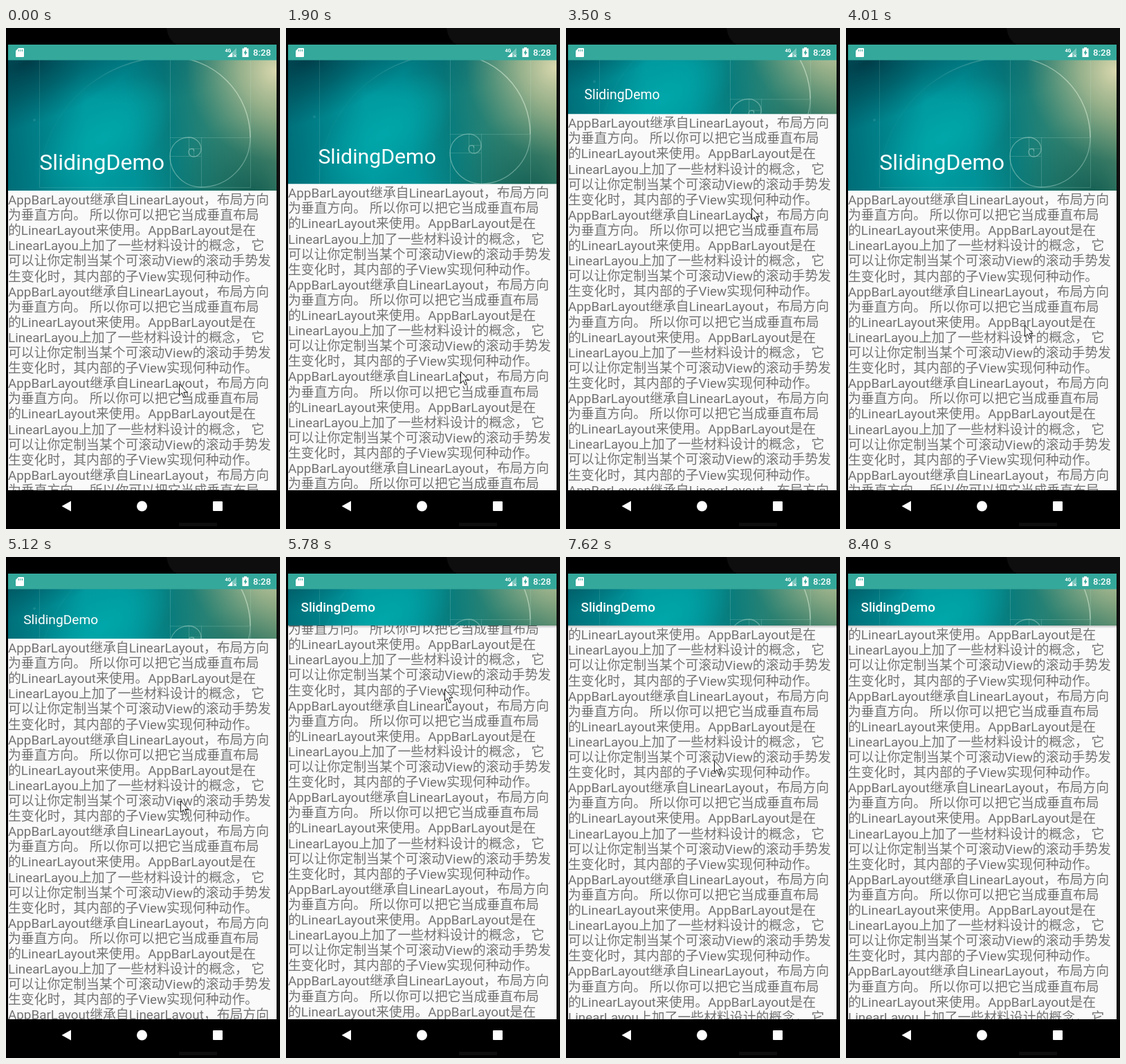
An HTML page for the animation above (8660 ms loop, 396 by 724 pixels).

```html
<!DOCTYPE html>
<html lang="zh-CN">
<head>
<meta charset="utf-8">
<title>SlidingDemo</title>
<style>
  html, body { margin: 0; width: 100%; height: 100%; overflow: hidden; background: #000; }
  svg { display: block; width: 100vw; height: 100vh; }
  text { font-family: Roboto, "Noto Sans CJK SC", "Noto Sans CJK", "Noto Sans CJK JP", sans-serif; white-space: pre; }
  #lines { font-size: 18.85px; fill: #737373; }
  .guide { fill: none; stroke: #bfe3d6; }
</style>
</head>
<body>
<svg viewBox="0 0 396 724" xmlns="http://www.w3.org/2000/svg">
  <defs>
    <linearGradient id="base" gradientUnits="userSpaceOnUse" x1="0" y1="150" x2="391" y2="110">
      <stop offset="0" stop-color="#006f79"/>
      <stop offset=".3" stop-color="#00999f"/>
      <stop offset=".45" stop-color="#00949a"/>
      <stop offset=".6" stop-color="#087c7d"/>
      <stop offset=".75" stop-color="#2b8273"/>
      <stop offset="1" stop-color="#668f6b"/>
    </linearGradient>
    <radialGradient id="dark" gradientUnits="userSpaceOnUse" cx="0" cy="0" r="1" gradientTransform="translate(30 50) rotate(-20) scale(190 88)">
      <stop offset="0" stop-color="#003642" stop-opacity=".9"/>
      <stop offset=".5" stop-color="#00444f" stop-opacity=".55"/>
      <stop offset="1" stop-color="#004c58" stop-opacity="0"/>
    </radialGradient>
    <radialGradient id="veil" gradientUnits="userSpaceOnUse" cx="0" cy="0" r="1" gradientTransform="translate(190 30) scale(150 80)">
      <stop offset="0" stop-color="#005864" stop-opacity=".5"/>
      <stop offset="1" stop-color="#005864" stop-opacity="0"/>
    </radialGradient>
    <radialGradient id="glow" gradientUnits="userSpaceOnUse" cx="0" cy="0" r="1" gradientTransform="translate(142 158) rotate(-38) scale(120 62)">
      <stop offset="0" stop-color="#00a9ab" stop-opacity=".9"/>
      <stop offset="1" stop-color="#00a9ab" stop-opacity="0"/>
    </radialGradient>
    <radialGradient id="sun" gradientUnits="userSpaceOnUse" cx="390" cy="62" r="130">
      <stop offset="0" stop-color="#d9d8ae"/>
      <stop offset=".4" stop-color="#b5c299" stop-opacity=".7"/>
      <stop offset="1" stop-color="#7fa584" stop-opacity="0"/>
    </radialGradient>
    <radialGradient id="shade" gradientUnits="userSpaceOnUse" cx="356" cy="248" r="120">
      <stop offset="0" stop-color="#0b564c" stop-opacity=".9"/>
      <stop offset="1" stop-color="#0b6660" stop-opacity="0"/>
    </radialGradient>
    <linearGradient id="arc" gradientUnits="userSpaceOnUse" x1="110" y1="0" x2="320" y2="0">
      <stop offset="0" stop-color="#bfe3d6" stop-opacity=".03"/>
      <stop offset="1" stop-color="#d3e8d2" stop-opacity=".6"/>
    </linearGradient>
    <linearGradient id="drop" x2="0" y2="1">
      <stop offset="0" stop-opacity=".24"/>
      <stop offset="1" stop-opacity="0"/>
    </linearGradient>
    <clipPath id="page"><rect id="pageClip" x="3" width="388"/></clipPath>
    <clipPath id="bar"><rect id="barClip" x="3" y="46" width="388"/></clipPath>
  </defs>

  <rect width="396" height="724"/>
  <path d="M232 0Q234 16 246 24H391V669H396V0ZM250 715H305V720H250Z" fill="#0e0e0e"/>
  <rect x="3" y="24" width="388" height="644" fill="#fafafa"/>

  <g clip-path="url(#page)"><g id="lines"></g></g>
  <rect id="shadow" x="3" y="99" width="388" height="4" fill="url(#drop)"/>

  <g clip-path="url(#bar)">
    <g id="image">
      <g id="layers"></g>
      <g class="guide" stroke-opacity=".2">
        <path d="M48.5 46V230.5H237" stroke-opacity=".14"/>
        <path d="M237.500 46V230.500H353.500V46M237 158.500H353M282.500 158V230M237 185.500H282M264.500 158V185M264 174.500H282M271.500 174V185"/>
      </g>
      <circle cx="41" cy="133" r="2" fill="#27929a" opacity=".6"/>
      <path d="M48 230A189 188 0 0 1 237 42A116 116 0 0 1 353 158" fill="none" stroke="url(#arc)" stroke-width="1.5"/>
      <path class="guide" d="M353 158A71 72 0 0 1 282 230A45 45 0 0 1 237 185A27 27 0 0 1 264 158A18 17 0 0 1 282 175A11 11 0 0 1 271 186A7 7 0 0 1 264 179A4.500 4.500 0 0 1 268.500 174.500A3 3 0 0 1 271.500 178" stroke-width="1.300" stroke-opacity=".42"/>
    </g>
    <text id="title" fill="#fff">SlidingDemo</text>
  </g>

  <rect x="3" y="24" width="388" height="22.500" fill="#34a89b"/>
  <g fill="#fff">
    <path d="M18 29H25Q26 29 26 30V41Q26 42 25 42H15Q14 42 14 41V33Z"/>
    <path d="M18.500 31V34M21 31V34M23.500 31V34" stroke="#34a89b"/>
    <text x="316.500" y="34.500" font-size="7" font-weight="700">4G</text>
    <path d="M333 29V42H320Z" opacity=".35"/>
    <path d="M327 35V42H320Z"/>
    <path d="M329.500 38.500L333 42M333 38.500L329.500 42" stroke="#fff"/>
    <path d="M344 28H348V29.500H350.500V42H341.500V29.500H344Z"/>
    <path d="M346.800 31L343.500 36.500H345.500V40L348.700 34.800H346.800Z" fill="#34a89b"/>
    <text x="357" y="39.800" font-size="13.2" font-weight="500">8:28</text>
    <path d="M80.500 691L94 683.500V698.500Z"/>
    <circle cx="196.500" cy="691" r="7.500"/>
    <rect x="299" y="684" width="14" height="14" rx="1"/>
  </g>

  <path id="cursor" d="M.5.5V17L4.300 13.500L7 20L9.500 19L6.800 12.600H12Z" fill="#fff" stroke="#111" stroke-linejoin="round"/>
</svg>

<script>
const LOOP = 8660, START = 1875, STEP = 132.9;
const TOP = 46, OPEN = 235, CLOSED = 99, BOTTOM = 668;
const RANGE = OPEN - CLOSED, MAX = 180, PITCH = 22.1;
const TEXT = [
  'AppBarLayout继承自LinearLayout，布局方向',
  '为垂直方向。 所以你可以把它当成垂直布局',
  '的LinearLayout来使用。AppBarLayout是在',
  'LinearLayou上加了一些材料设计的概念， 它',
  '可以让你定制当某个可滚动View的滚动手势发',
  '生变化时，其内部的子View实现何种动作。'
];

// Key points of the pointer: screen refresh count, x, y
const PATH = [
  [-1, 250, 514], [4, 271, 284], [7, 270, 183], [9, 271, 183], [16, 258, 429],
  [19.3, 236, 500], [24, 252, 352], [28, 234, 177], [29, 229, 191], [34, 235, 541],
  [36, 235, 543], [37, 237, 467], [42, 235, 310], [43, 214, 294], [44, 193, 377],
  [45.5, 195, 445], [47, 199, 384], [49, 310, 730]
];

// Strokes: first refresh, pointer y at which the page is scrolled to its top
const STROKES = [[0, 506], [10, 371], [21, 469], [29, 357], [36, 497.5], [43, 564], [48, Infinity]];

const $ = id => document.getElementById(id);
const set = (el, attrs) => { for (const k in attrs) el.setAttribute(k, attrs[k]); return el; };
const add = (parent, tag, attrs) =>
  set(parent.appendChild(document.createElementNS('http://www.w3.org/2000/svg', tag)), attrs);
const clamp = (v, lo, hi) => Math.min(hi, Math.max(lo, v));
const mix = (a, b, k) => a + (b - a) * k;

for (let i = 0; i < 30; i++)
  add($('lines'), 'text', { x: 3, y: 255 + i * PITCH }).textContent = TEXT[i % TEXT.length];
for (const fill of ['base', 'dark', 'veil', 'glow', 'shade', 'sun'])
  add($('layers'), 'rect', { x: 3, y: TOP, width: 388, height: OPEN - TOP, fill: `url(#${fill})` });

// Mean rate over one span of the path, and the tangent at a key point (0 where it turns)
const rate = (i, c) => PATH[i] && PATH[i + 1]
  ? (PATH[i + 1][c] - PATH[i][c]) / (PATH[i + 1][0] - PATH[i][0]) : 0;
function tangent(i, c) {
  const a = rate(i - 1, c), b = rate(i, c);
  return a * b > 0 ? 2 * a * b / (a + b) : 0;
}

// Smooth curve through the key points that never overshoots
function along(n, c) {
  const i = clamp(PATH.findLastIndex(p => p[0] <= n), 0, PATH.length - 2);
  const a = PATH[i], b = PATH[i + 1], span = b[0] - a[0], u = (n - a[0]) / span;
  return mix(a[c], b[c], u * u * (3 - 2 * u))
    + span * u * (1 - u) * (tangent(i, c) * (1 - u) - tangent(i + 1, c) * u);
}

function scrollAt(n, y) {
  const stroke = STROKES.findLast(s => s[0] <= n);
  return stroke ? clamp(stroke[1] - y, 0, MAX) : 0;
}

function draw(time) {
  const n = clamp(Math.floor((time - START) / STEP), -1, 49);
  const x = along(n, 1), y = along(n, 2), scroll = scrollAt(n, y);
  const fold = Math.min(scroll, RANGE), k = fold / RANGE, edge = OPEN - fold;

  set($('lines'), { transform: `translate(0 ${-scroll})` });
  set($('pageClip'), { y: edge, height: BOTTOM - edge });
  set($('barClip'), { height: edge - TOP });
  set($('image'), { transform: `translate(0 ${-fold / 2})` });
  set($('shadow'), { opacity: k === 1 ? 1 : 0 });
  set($('title'), {
    x: mix(48.3, 21.5, k),
    y: mix(205, 79.4, k),
    'font-size': mix(32.1, 18.9, 1 - (1 - k) ** 2),
    'font-weight': k === 1 ? 500 : 400
  });
  set($('cursor'), { transform: `translate(${Math.round(x)} ${Math.round(y)})` });
}

const began = performance.now();
function tick() {
  draw((performance.now() - began) % LOOP);
  requestAnimationFrame(tick);
}
tick();
</script>
</body>
</html>
```
